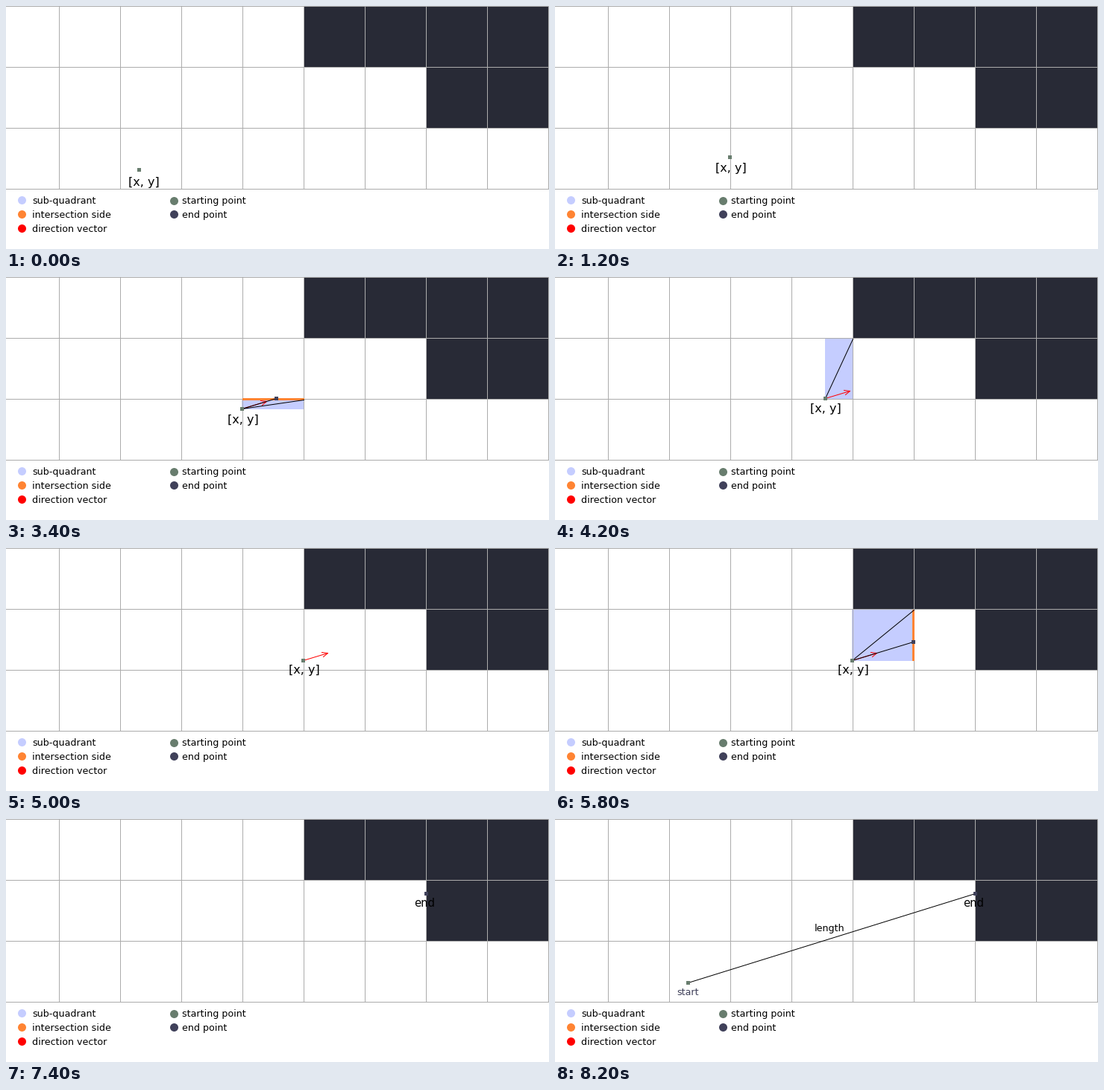
Write a matplotlib script that moves like this. It is 728 by 327 pixels and loops after 9.2 s.

```python
import matplotlib.pyplot as plt
from matplotlib.animation import FuncAnimation
from matplotlib.patches import Circle, Rectangle

W, H, DPI = 728, 327, 64
PX = 72 / DPI  # points per pixel
STEP, LOOP, TICK = 200, 9200, 100

WALL, GRID = "#282a36", "#acacac"
QUAD, SIDE, VECTOR = "#c5cdff", "#ff8433", "#ff0000"
START, END = "#687d6e", "#40415a"

# Ray positions at each cell border, and the label anchors beneath them
POINTS = [(178, 220), (234, 203), (316, 177), (362, 163),
          (398, 151), (480, 126), (563, 100)]
LABELS = [(163.6, 242), (214.6, 223), (296.6, 197), (341.6, 182),
          (378.6, 169), (460.6, 145), (543.6, 116)]
# Far corner of each sub-quadrant, and whether the ray leaves sideways
CORNERS = [(235, 164), (317, 164), (399, 164), (399, 82), (481, 82), (563, 82)]
SIDEWAYS = [True, True, False, True, True, True]

plt.rcParams["font.family"] = "DejaVu Sans"
fig = plt.figure(figsize=(W / DPI, H / DPI), dpi=DPI, facecolor="white")
ax = fig.add_axes([0, 0, 1, 1])
ax.set_xlim(0, W)
ax.set_ylim(H, 0)
ax.axis("off")


def box(x, y, w, h, color, z):
    return ax.add_patch(Rectangle((x, y), w, h, fc=color, lw=0, zorder=z,
                                  antialiased=False))


def dot(point, color):
    return box(point[0] - 2, point[1] - 2, 5, 5, color, 7)


def path(points, color, z):
    xs, ys = zip(*points)
    return ax.plot([x + 0.5 for x in xs], [y + 0.5 for y in ys],
                   color=color, lw=PX, zorder=z)[0]


def write(x, y, text, size=12.6, color="black"):
    return ax.text(x, y, text, size=size * PX, color=color,
                   va="baseline", zorder=8)


def draw_stage():
    box(400, 0, 328, 82, WALL, 1)
    box(564, 82, 164, 82, WALL, 1)
    for x in range(71, W, 82):
        box(x, 0, 1, 247, GRID, 3)
    for y in range(0, 247, 82):
        box(0, y, W, 1, GRID, 3)
    legend = [(21.5, 261.5, QUAD, 35.6, 266, "sub-quadrant"),
              (21.5, 280.5, SIDE, 35, 285, "intersection side"),
              (21.5, 299.5, VECTOR, 35, 304, "direction vector"),
              (225.5, 262.5, START, 236, 266, "starting point"),
              (225.5, 280.5, END, 236, 285, "end point")]
    for cx, cy, color, x, y, text in legend:
        ax.add_patch(Circle((cx, cy), 5.5, fc=color, lw=0))
        write(x, y, text)


def arrow(x, y):
    tip = (x + 33, y - 10)
    barbs = [(tip[0] - 8, tip[1] - 1), tip, (tip[0] - 6, tip[1] + 5)]
    return [path([(x, y), tip], VECTOR, 5), path(barbs, VECTOR, 5)]


def draw_cast(i, stage):
    """One grid step: parts appear one after another."""
    (x, y), (cx, cy) = POINTS[i], CORNERS[i]
    parts = [dot((x, y), START), write(*LABELS[i], "[x, y]", 16)]
    if stage >= 1:
        parts += arrow(x, y)
    if stage >= 2:
        parts.append(box(x, cy + 1, cx - x, y - cy, QUAD, 2))
    if stage >= 3:
        parts.append(path([(x, y), (cx, cy + 1)], "black", 6))
    if stage >= 4:
        if SIDEWAYS[i]:
            parts.append(box(cx - 2, cy + 1, 3, y - cy, SIDE, 4))
        else:
            parts.append(box(x + 1, cy - 1, cx - x, 3, SIDE, 4))
    if stage >= 5:
        parts.append(path([(x, y), POINTS[i + 1]], "black", 6))
        parts.append(dot(POINTS[i + 1], END))
    return parts


def draw_result(t):
    parts = [dot(POINTS[-1], END)]
    if t < 7400:
        parts.append(write(*LABELS[-1], "[x, y]", 16))
    else:
        parts.append(write(547.6, 118, "end", 14.8))
    if t >= 7600:
        parts += [dot(POINTS[0], START),
                  write(163.2, 237, "start", color=END)]
    if t >= 7900:
        parts.append(path([POINTS[0], POINTS[-1]], "black", 6))
    if t >= 8200:
        parts.append(write(347.4, 151, "length"))
    return parts


shown = []


def update(frame):
    while shown:
        shown.pop().remove()
    t = frame * TICK
    cycle, rest = divmod(t, 6 * STEP)
    if cycle < len(CORNERS):
        shown.extend(draw_cast(cycle, rest // STEP))
    else:
        shown.extend(draw_result(t))
    return shown


draw_stage()
anim = FuncAnimation(fig, update, frames=LOOP // TICK, interval=TICK,
                     init_func=lambda: update(0), repeat=True,
                     repeat_delay=0, blit=False)
plt.show()
```
